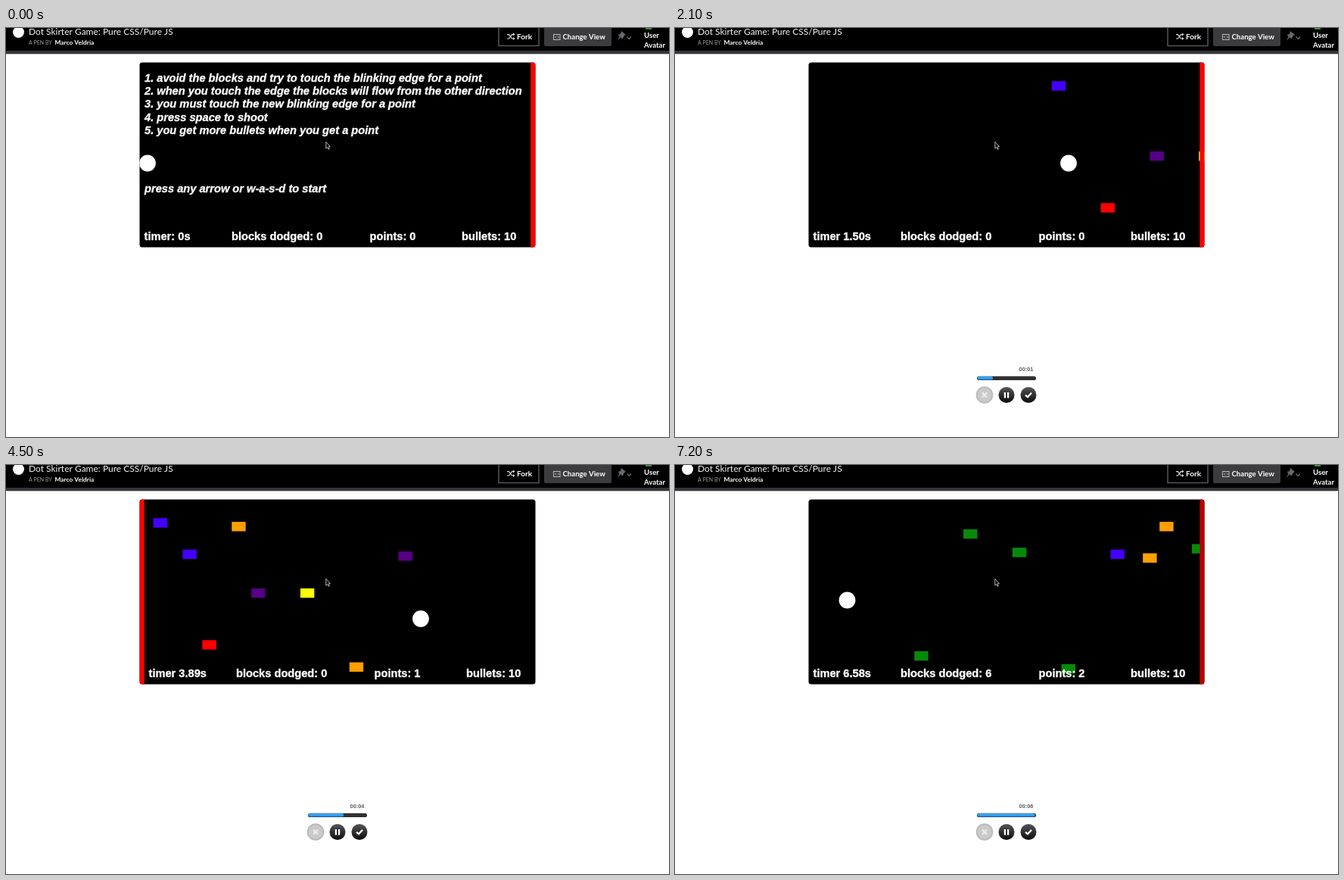
Recreate the animation shown at these times as an HTML page with a canvas. Size 876 px wide and 540 px high, loop 7.3 s.

```html
<!DOCTYPE html>
<html lang="en">
<head>
<meta charset="utf-8">
<title>Dot Skirter Game</title>
<style>
html, body { margin: 0; width: 100%; height: 100%; overflow: hidden; background: #fff; }
canvas { display: block; }
</style>
</head>
<body>
<canvas id="stage" width="876" height="540"></canvas>
<script>
const ctx = document.getElementById('stage').getContext('2d');
const LOOP = 7300, STEP = 100;
const START = 0.59, FIRST_POINT = 3.5, SECOND_POINT = 6.4;
const SPEED = 129.4, SPACING = 64.8, BORDER = 6;
const BOARD = { x: 176.5, y: 45.5, w: 523, h: 244 };
const EDGE = { left: 186, right: 702 };
const SANS = '"Liberation Sans", Arial, sans-serif';
const LATO = 'Lato, sans-serif';
const COLORS = { blue: '#4400ff', indigo: '#560085', red: '#ff0000',
  yellow: '#ffff00', orange: '#ffa000', green: '#078a0b' };

// Blocks in order of release: color and height on the board in percent.
const BLOCKS = [
  ['blue', 10], ['red', 76], ['indigo', 48], ['yellow', 48], ['orange', 88],
  ['indigo', 28], ['orange', 12], ['blue', 27], ['green', 89], ['green', 26],
  ['green', 16], ['green', 82], ['orange', 29], ['green', 24]
];

const RULES = [
  '1. avoid the blocks and try to touch the blinking edge for a point',
  '2. when you touch the edge the blocks will flow from the other direction',
  '3. you must touch the new blinking edge for a point',
  '4. press space to shoot',
  '5. you get more bullets when you get a point'
];

const ramp = (t, from, to) => Math.min(1, Math.max(0, (t - from) / (to - from)));
const gameTime = t => Math.max(0, t - START) * 0.996;
const pointsAt = t => (t >= FIRST_POINT) + (t >= SECOND_POINT);

function ballAt(t) {
  return {
    x: 187 + 333 * ramp(t, 0.69, 2.1) + 178.5 * ramp(t, 2.4, 3.5)
      - 156.5 * ramp(t, 3.6, 4.5) - 355 * ramp(t, 4.96, 6.4) + 40.5 * ramp(t, 7, 7.2),
    y: 178.5 + 24.5 * (ramp(t, 2.15, 2.3) - ramp(t, 4.7, 4.85))
  };
}

// Blocks leave one edge at even distances; each touch swaps that edge.
function blocksAt(t) {
  const travel = SPEED * (gameTime(t) - 0.21);
  return BLOCKS.map(([color, lane], i) => {
    const release = i * SPACING - 27.5;
    const releaseTime = START + (release / SPEED + 0.21) / 0.996;
    const rightward = pointsAt(releaseTime) === 1;
    const moved = travel - release;
    return {
      color, rightward,
      x: rightward ? EDGE.left + moved : EDGE.right - moved,
      y: 52 + 2.44 * lane,
      released: moved > -1,
      gone: moved > EDGE.right - EDGE.left
    };
  });
}

function rect(x, y, w, h, color) {
  ctx.fillStyle = color;
  ctx.fillRect(x, y, w, h);
}

function roundRect(x, y, w, h, r, color) {
  ctx.beginPath();
  ctx.roundRect(x, y, w, h, r);
  ctx.fillStyle = color;
  ctx.fill();
}

function circle(x, y, r, color) {
  ctx.beginPath();
  ctx.arc(x, y, r, 0, Math.PI * 2);
  ctx.fillStyle = color;
  ctx.fill();
}

function line(points, color, width) {
  ctx.beginPath();
  points.forEach(([x, y]) => ctx.lineTo(x, y));
  ctx.strokeStyle = color;
  ctx.lineWidth = width;
  ctx.stroke();
}

function polygon(points, color) {
  ctx.beginPath();
  points.forEach(([x, y]) => ctx.lineTo(x, y));
  ctx.fillStyle = color;
  ctx.fill();
}

function text(str, x, y, font, color = '#fff') {
  ctx.font = font;
  ctx.fillStyle = color;
  ctx.fillText(str, x, y);
}

function boardText(str, x, y, style = '') {
  text(str, x, y, `${style} bold 14.65px ${SANS}`);
  ctx.strokeStyle = '#fff';
  ctx.lineWidth = 0.35;
  ctx.strokeText(str, x, y);
}

function vertical(y0, y1, top, bottom) {
  const g = ctx.createLinearGradient(0, y0, 0, y1);
  g.addColorStop(0, top);
  g.addColorStop(1, bottom);
  return g;
}

function drawHeader() {
  rect(0, 0, 876, 30, '#000');
  rect(0, 30, 876, 4.3, '#36353b');
  circle(16.5, 5.5, 7.5, '#fff');
  text('Dot Skirter Game: Pure CSS/Pure JS', 30, 9, `12px ${LATO}`, '#f4f4f4');
  text('A PEN BY', 30, 21.8, `7px ${LATO}`, '#999');
  text('Marco Veldria', 64.5, 22, `bold 8.4px ${LATO}`);

  ctx.strokeStyle = '#55555a';
  ctx.lineWidth = 1.5;
  ctx.strokeRect(651, -5, 53, 28.5);
  for (const side of [-1, 1]) {
    const y = 11.3 + side * 2.7;
    line([[662, 22.6 - y], [664.5, 22.6 - y], [668.5, y], [671, y]], '#ddd', 1.2);
    polygon([[670, y - 2], [672.5, y], [670, y + 2]], '#ddd');
  }
  text('Fork', 675, 15, `bold 10px ${LATO}`);

  roundRect(711, -5, 89, 29, 2, '#3b3b40');
  ctx.strokeStyle = '#bbb';
  ctx.lineWidth = 1;
  ctx.strokeRect(723.5, 8.5, 8.5, 7);
  for (const side of [-1, 1]) {
    const x = 728 + side;
    line([[x, 10.5], [x + side * 1.5, 12], [x, 13.5]], '#bbb', 0.9);
  }
  text('Change View', 735.5, 15, `bold 9.6px ${LATO}`);

  polygon([[813, 4], [819, 9], [817, 10], [814.5, 14.5], [812, 12.3],
    [808, 17], [810.5, 11], [808.5, 9], [812, 8]], '#68686c');
  line([[820.5, 11.5], [823.3, 14.5], [826, 11.5]], '#68686c', 1.3);

  rect(845, 0, 8, 1.8, '#3c9a3c');
  text('User', 843, 13, `bold 9.6px ${LATO}`);
  text('Avatar', 843, 26, `bold 9.6px ${LATO}`);
}

function drawEdge(t, age, leftSide) {
  const phase = leftSide ? 0.5 : 0;
  const justMoved = age < 0.15 && t > START;
  const level = justMoved ? 0 : ramp(0.56 + 0.54 * Math.cos(2 * Math.PI * (t - phase)), 0, 1);
  const x = leftSide ? BOARD.x : BOARD.x + BOARD.w - BORDER;
  rect(x, BOARD.y, BORDER, BOARD.h, `rgb(${Math.round(255 * level)},0,0)`);
}

function drawBoard(t) {
  const points = pointsAt(t);
  const age = t - [0, FIRST_POINT, SECOND_POINT][points];
  const leftSide = points === 1;
  const started = t >= START;
  const blocks = blocksAt(t);
  const dodged = blocks.filter(b => b.gone).length;
  const ball = ballAt(t);

  ctx.save();
  ctx.beginPath();
  ctx.roundRect(BOARD.x, BOARD.y, BOARD.w, BOARD.h, 3.5);
  ctx.fillStyle = '#000';
  ctx.fill();
  ctx.clip();
  drawEdge(t, age, leftSide);

  // The left border pushes the whole content aside.
  ctx.save();
  ctx.translate(leftSide ? BORDER : 0, 0);
  if (started) {
    blocks.filter(b => b.released && !b.gone)
      .forEach(b => rect(b.x - 9.2, b.y - 6.2, 18.4, 12.4, COLORS[b.color]));
  }
  if (points && age < 0.5) {
    ctx.globalAlpha = 1 - age * 1.6;
    text('+1', ball.x - 20, ball.y + 10.5, `bold 20px ${SANS}`);
    ctx.globalAlpha = 1;
  }
  circle(ball.x, ball.y, 10.9, '#fff');

  if (!started) {
    RULES.forEach((rule, i) => boardText(rule, 183, 71.2 + i * 17.1, 'italic'));
    boardText('press any arrow or w-a-s-d to start', 183, 217.2, 'italic');
  }
  boardText(started ? `timer ${gameTime(t).toFixed(2)}s` : 'timer: 0s', 182.5, 279.7);
  boardText(`blocks dodged: ${dodged}`, 298, 279.7);
  boardText(`points: ${points}`, 480.5, 279.7);
  boardText('bullets: 10', 602, 279.7);
  ctx.restore();

  drawEdge(t, age, leftSide);
  ctx.restore();
}

function drawCursor() {
  const shape = [[422.8, 150.3], [422.8, 159], [424.7, 157.4], [426, 160.2],
    [427.3, 159.6], [426.1, 156.8], [428.4, 156.6]];
  polygon(shape, '#000');
  line([...shape, shape[0]], '#ddd', 0.8);
}

function drawRecorder(t) {
  if (t < 0.1) return;
  const seconds = Math.max(0, Math.floor(t - 0.4));
  text(`00:0${seconds}`, 454.6, 453, `bold 7.3px ${SANS}`, '#5c5c5c');

  roundRect(399, 459.7, 78, 5.4, 2.7, '#302f31');
  const width = Math.max(0, 10.86 * (t - 0.2));
  roundRect(399.5, 460.2, width, 4.4, 2.2, vertical(460, 465, '#52bbff', '#0a80e4'));

  circle(409, 484.5, 11.3, '#b9b9b9');
  circle(409, 484.5, 9.5, '#cacaca');
  line([[406, 481.5], [412, 487.5]], '#eee', 2.2);
  line([[412, 481.5], [406, 487.5]], '#eee', 2.2);

  const dark = vertical(474, 495, '#555', '#0c0c0c');
  circle(438, 484.5, 10.5, dark);
  rect(434.8, 481, 2.2, 7.5, '#fff');
  rect(439, 481, 2.2, 7.5, '#fff');
  circle(467, 484.5, 10.5, dark);
  line([[463, 484.7], [466, 487.3], [471, 481.7]], '#fff', 2.2);
}

function draw(now) {
  const t = Math.floor(now % LOOP / STEP) * STEP / 1000;
  rect(0, 0, 876, 540, '#fff');
  drawHeader();
  drawBoard(t);
  drawCursor();
  drawRecorder(t);
  requestAnimationFrame(draw);
}

requestAnimationFrame(draw);
</script>
</body>
</html>
```
